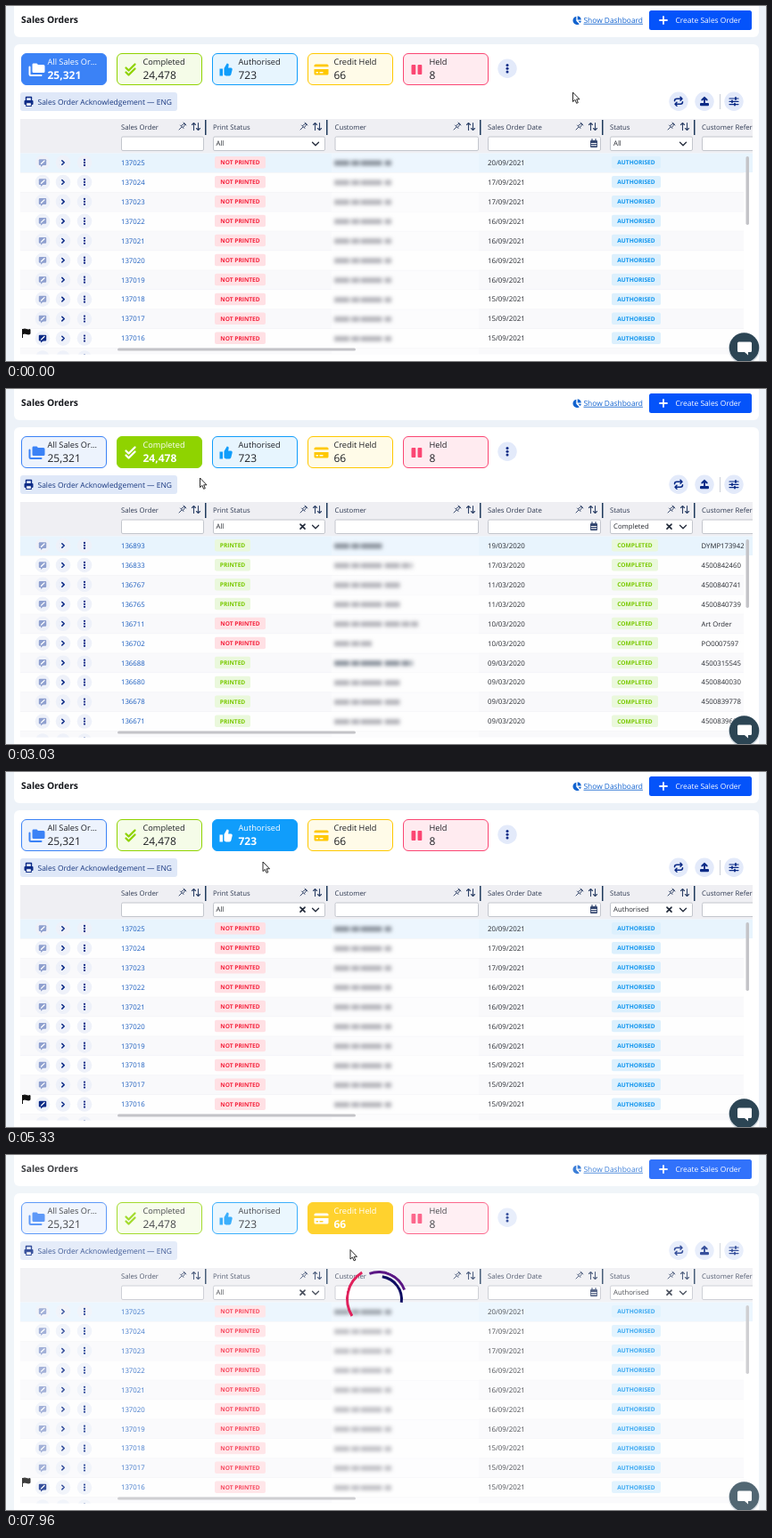
These frames come from a looping animation (852x399 px, 8000 ms). An HTML page:

```html
<!DOCTYPE html>
<html lang="en">
<head>
<meta charset="utf-8">
<title>Sales Orders</title>
<style>
html, body { margin: 0; width: 100%; height: 100%; overflow: hidden; background: #edf2f8; }
#stage { position: absolute; left: 0; top: 0; width: 852px; height: 399px; overflow: hidden; }
svg { position: absolute; left: 0; top: 0; }
text { font-family: "Open Sans", "Noto Sans", sans-serif; text-rendering: geometricPrecision; white-space: pre; }
.line { fill: none; stroke: currentColor; stroke-linecap: round; stroke-linejoin: round; }
.card { color: var(--main); }
.card rect.box { fill: var(--pale); stroke: var(--main); }
.card text { fill: #1d1f24; }
.card.on { color: #fff; }
.card.on rect.box { fill: var(--main); }
.card.on text { fill: #fff; }
.card.on .num { font-weight: 700; }
#wash { position: absolute; inset: 0; background: #fff; }
.ring { position: absolute; box-sizing: border-box; border: 3px solid transparent; border-radius: 50%; }
</style>
</head>
<body>
<div id="stage">
  <svg id="page" width="852" height="399"></svg>
  <div id="wash"></div>
  <div id="spin"></div>
  <svg width="852" height="399"><path id="cursor" d="M0 0V10.6L2.4 8.4 4.1 12.3 5.8 11.6 4.2 7.8H7.5Z" fill="#fff" stroke="#111" stroke-width=".9"/></svg>
</div>
<script>
const $ = id => document.getElementById(id);
const NAVY = '#0b2a86', INK = '#24272e';

const text = (x, y, s, size, fill = INK, weight = 400, more = '') =>
  `<text x="${x}" y="${y}" font-size="${size}" fill="${fill}" font-weight="${weight}" ${more}>${s}</text>`;
const rect = (x, y, w, h, fill, r = 0, more = '') =>
  `<rect x="${x}" y="${y}" width="${w}" height="${h}" rx="${r}" fill="${fill}" ${more}/>`;
const disc = (x, y, r, fill) => `<circle cx="${x}" cy="${y}" r="${r}" fill="${fill}"/>`;
const line = (d, width = 1.3, color = 'currentColor') =>
  `<path class="line" d="${d}" stroke-width="${width}" style="color:${color}"/>`;
const at = (x, y, s) => `<g transform="translate(${x} ${y})">${s}</g>`;
const dots = (x, y, gap, r) => [-gap, 0, gap].map(d => disc(x, y + d, r, NAVY)).join('');

// Summary cards
const cardIcons = [
  `<path d="M-4-7h4l1.500 1.500h6q1.500 0 1.500 1.500v6q0 1.500-1.500 1.500h-11q-1.500 0-1.500-1.500v-7.500q0-1.500 1-1.500z" fill="currentColor"/>` +
  line('M-8-3V5Q-8 6.500-6.500 6.500H5', 2),
  line('M-5-2L-2 1 5-6M-5 3L-2 6 5-1', 2.3),
  `<path d="M-7-1h3.500V7H-7zM-2-1.500L1.200-7q2.300 0 1.900 2.400L2.600-2H6q1.500.4 1.200 2L5.800 5.600Q5.400 7 4 7H0L-2 5.800z" fill="currentColor"/>`,
  `<path fill-rule="evenodd" d="M-6.500-6h13q1.500 0 1.500 1.500v9q0 1.500-1.500 1.500h-13Q-8 6-8 4.500v-9Q-8-6-6.500-6zM-8-3.200v2.700H8v-2.700zM-6 2.400v1.500h2.500V2.400zM-2 2.400v1.500h4V2.400z" fill="currentColor"/>`,
  rect(-6, -5.5, 4.8, 11, 'currentColor', 1) + rect(1, -5.5, 4.8, 11, 'currentColor', 1)
];
const cards = [
  ['All Sales Or...', '25,321', '#3b82f6', '#edf3fd'],
  ['Completed', '24,478', '#8fd300', '#f5fce8'],
  ['Authorised', '723', '#109dfb', '#e7f5fe'],
  ['Credit Held', '66', '#ffc800', '#fffbe8'],
  ['Held', '8', '#fb4673', '#ffebf0']
];
const cardSvg = ([label, num, main, pale], i) => {
  const x = 17 + 107 * i;
  return `<g class="card" style="--main:${main};--pale:${pale}">` +
    `<rect class="box" x="${x + .5}" y="53.500" width="95" height="35" rx="5.500"/>` +
    at(x + (i ? 15.5 : 17.5), 71.5, cardIcons[i]) +
    text(x + 29.5, 66, label, 9.2) +
    text(x + 29.5, 82, num, 12, INK, 400, 'class="num"') + '</g>';
};

// Table
const columns = [
  ['Sales Order', 129, 222], ['Print Status', 232, 358], ['Customer', 368.5, 530],
  ['Sales Order Date', 540, 667], ['Status', 677, 770], ['Customer Reference', 780, 880]
];
const pin = line('M1-4L4-1M2-3L-1.500-.5M3-2L.5 1.500M-2.500-1L1 2.500M-1 1L-4 4', 1, '#3c4d70');
const sort = line('M-2.500 4V-4M-4.500-2L-2.500-4-.5-2M2.500-4V4M.5 2L2.500 4 4.500 2', 1.1, '#2e4268');
const down = line('M-3.500-1.500L0 2 3.500-1.500', 1.3, '#222a3a');
const cross = line('M-2.500-2.500L2.500 2.500M2.500-2.500L-2.500 2.500', 1.7, '#222a3a');
const calendar = rect(-4, -3.5, 8, 8, '#33466f', 1) + line('M-2-5V-3M2-5V-3', 1.2, '#33466f') +
  line('M-2.800 0H2.800M-2.800 2.300H2.800', 1, '#fff');

const columnSvg = ([name, x, end], i) =>
  text(x, 138.7, name, 7.75, '#2f3a52') +
  rect(x + .5, 147, end - x - 1, 15.5, '#fff', 1.5, 'stroke="#c3c6cd"') +
  (i < 5 ? at(end - 24, 135, pin) + at(end - 9, 135.5, sort) + rect(end + 1, 128, 1.5, 17, '#1f3a5c') : '') +
  (i === 3 ? at(659, 154.5, calendar) : '') +
  (i === 1 || i === 4 ? at(end - 11, 154.7, down) : '');

const badge = (x, y, s, color, pale, w) =>
  rect(x, y - 7, w, 13.5, pale, 2) +
  text(x + w / 2, y + 2.3, s, 6.6, color, 700, 'text-anchor="middle"');

const note = (y, color) => at(41, y, rect(-4.2, -3.8, 8.4, 6.8, color, 1) +
  `<path d="M-2 2.500V5L1 2.500z" fill="${color}"/>` + line('M-1.500 1.300L2-2', 1.3, '#fff'));

const rowIcons = (y, color) => [41, 64, 88].map(x => disc(x, y, 8.3, '#eef1f9')).join('') +
  note(y, color) + at(64, y, line('M-1.200-2.300L1.200 0-1.200 2.300', 1.5, NAVY)) + dots(88, y, 3, 1.15);

const blurred = (y, w, dark) => `<path d="M368 ${y + .5}H${368 + w}" stroke="${dark ? '#8b939d' : '#b4b4ba'}" ` +
  `stroke-width="6" stroke-dasharray="17 2 9 1.500 24 3" filter="url(#soft)"/>`;

function rowSvg(r, i) {
  const y = 176 + 21.95 * i;
  const fill = i === 0 ? '#e8f4fd' : i % 2 ? '#fefefe' : '#f9f9fb';
  let s = rect(16, y - 10.5, 813, 21.9, fill) + rect(16, y + 11, 813, .6, '#ececf0') +
    rect(365, y - 10, 165, 21, '#fff', 0, `opacity="${i ? .5 : .2}"`) +
    rowIcons(y, r.dark ? NAVY : '#8fa0cf');
  if (!r.id) return s;
  s += text(129, y + 2.8, r.id, 7.75, '#1559bd') + blurred(y, r.width, i === 0 || r.bold) +
    text(540, y + 2.8, r.date, 7.85) + text(779.5, y + 2.8, r.ref || '', 7.75);
  s += r.printed ? badge(234, y, 'PRINTED', '#79c900', '#eaf8dc', 40)
    : badge(234, y, 'NOT PRINTED', '#f5213c', '#ffe0e4', 57);
  s += r.done ? badge(679, y, 'COMPLETED', '#79c900', '#eaf8dc', 52)
    : badge(679, y, 'AUTHORISED', '#0e94ee', '#dcf0fd', 55);
  if (r.dark) s += `<path d="M18.500 363V373M19 363.500q2-1 4 0t4 0v5q-2 1-4 0t-4 0z" fill="#111" stroke="#111"/>`;
  return s;
}

const days = [20, 17, 17, 16, 16, 16, 16, 15, 15, 15];
const openRows = days.map((d, i) => ({
  id: 137025 - i, date: d + '/09/2021', width: 64, dark: i === 9
}));
const doneRows = [
  [136893, 19, 'DYMP173942', 56], [136833, 17, '4500842460', 88], [136767, 11, '4500840741', 74],
  [136765, 11, '4500840739', 74], [136711, 10, 'Art Order', 94], [136702, 10, 'PO0007597', 42],
  [136688, '09', '4500315545', 88], [136680, '09', '4500840030', 74],
  [136678, '09', '4500839778', 74], [136671, '09', '4500839601', 74]
].map(([id, day, ref, width], i) => ({
  id, ref, width, date: day + '/03/2020', done: true, printed: i !== 4 && i !== 5, bold: i === 6
}));
const tableSvg = (id, rows) => `<g id="${id}" clip-path="url(#body)">${[...rows, {}].map(rowSvg).join('')}</g>`;

// Toolbar icons
const printer = rect(-5, -1.5, 10, 5, NAVY, 1) + line('M-3-2V-5H3V-2', 1.4, NAVY) +
  rect(-2.8, 1.2, 5.6, 3.8, '#fff', 0, `stroke="${NAVY}"`);
const refresh = line('M-4.500-.5Q-4.500-3-2-3H4M2-5L4-3 2-1M4.500.5Q4.500 3 2 3H-4M-2 1L-4 3-2 5', 1.5, NAVY);
const upload = line('M0 1.500V-4M-2.700-1.800L0-4.500 2.700-1.800', 1.9, NAVY) + rect(-5, 1.7, 10, 3.3, NAVY, 1);
const sliders = line('M-5-3.300H5M-5 0H5M-5 3.300H5', 1.2, NAVY) +
  line('M2-4.300V-2.300M-2-1V1M1 2.300V4.300', 1.8, NAVY);
const tool = (x, icon) => disc(x, 107.3, 10.7, '#e3eafa') + at(x, 107.3, icon);

$('page').innerHTML = `<defs>
  <filter id="soft" filterUnits="userSpaceOnUse" x="350" y="160" width="180" height="240"><feGaussianBlur stdDeviation="2.300"/></filter>
  <clipPath id="body"><rect x="16" y="165" width="811" height="226.500"/></clipPath>
  <clipPath id="head"><rect x="16" y="126" width="821" height="40"/></clipPath></defs>` +
  rect(0, 0, 852, 399, '#edf2f8') + rect(9, -8, 835, 43, '#fff', 6) + rect(9, 43, 835, 370, '#fff', 6) +
  text(17, 18.5, 'Sales Orders', 10.3, '#14161b', 700) +
  at(640, 16, `<path d="M-.7-4.300V.7L2.800 4.200A4.700 4.700 0 1 1-.7-4.300zM.7-4.700A4.700 4.700 0 0 1 4.800-.5H.7zM1.500.7H4.900A4.700 4.700 0 0 1 3.700 3z" fill="#1263cf"/>`) +
  text(647.5, 18.8, 'Show Dashboard', 8.4, '#1263cf', 400, 'text-decoration="underline"') +
  rect(721, 5, 115, 22, '#0453fa', 2.5) + line('M733 16H741M737 12V20', 1.8, '#fff') +
  text(750.5, 19, 'Create Sales Order', 8.45, '#fff') +
  cards.map(cardSvg).join('') +
  disc(562, 70.3, 10.7, '#e3eafa') + dots(562, 70.3, 3.7, 1.5) +
  rect(16, 97, 176, 21, '#dfe8f8', 3) + at(25.500, 107.500, printer) +
  text(35.5, 111, 'Sales Order Acknowledgement — ENG', 8.45, '#16367f') +
  tool(754, refresh) + tool(783, upload) + tool(816, sliders) + rect(800, 99, 1, 17, '#c9ced8') +
  `<g clip-path="url(#head)">` + rect(16, 127, 821, 38.500, '#efeff3') + columns.map(columnSvg).join('') +
  text(235.500, 157.400, 'All', 7.75) +
  `<text id="status" x="681" y="157.400" font-size="7.750" fill="${INK}"></text>` +
  `<g id="clear">${at(332.5, 154.7, cross)}${at(743.5, 154.7, cross)}</g></g>` +
  rect(827, 165.500, 10, 21.500, '#e8f4fd') +
  tableSvg('open', openRows) + tableSvg('done', doneRows) +
  rect(829.5, 169, 3.5, 77, '#c4c4c8', 1.7) +
  rect(125, 384.5, 267, 3, '#c4c4c8', 1.5) +
  disc(827.5, 385, 17.5, '#d3dae1') + disc(827.5, 384, 16.7, '#2c4554') +
  `<path d="M821.500 377.500h13q1.500 0 1.500 1.500v8.500q0 1.500-1.500 1.500h-2.500v3.500l-4-3.500h-6.500q-1.500 0-1.500-1.500V379q0-1.500 1.500-1.500z" fill="#fff"/>`;

// diameter, colour, degrees per second
const rings = [[74, '#e0215c', 498], [64, '#5b1785', 298], [54, '#0e0c62', 878]];
$('spin').innerHTML = rings.map(([d, c]) =>
  `<div class="ring" style="width:${d}px;height:${d}px;left:${417.5 - d / 2}px;top:${161.5 - d / 2}px;border-top-color:${c}"></div>`).join('');

const LOOP = 8000;
const loads = [[1800, 2940], [4050, 4930], [6670, 9000]];
const picks = [1770, 4030, 6650];

// time, x, y of the pointer
const path = [
  [0, 635.5, 97], [430, 635.5, 97], [800, 470, 102], [1230, 253, 97], [1460, 215.5, 95],
  [1760, 182, 76], [1900, 182, 76], [2100, 197, 88], [2500, 212, 97], [2900, 217.5, 100],
  [3330, 217.5, 100], [3700, 250, 88], [4060, 279.5, 73], [4160, 279.5, 73], [4600, 284, 90],
  [4930, 288, 101], [5330, 288, 101], [5600, 312, 108], [5900, 370, 68], [6130, 404, 36],
  [6500, 383, 67], [6700, 383, 67], [6960, 370.5, 101], [7060, 370.5, 102],
  [7400, 379, 105], [7800, 386, 106.5], [8000, 386, 106.5]
];
const same = (a, b) => a[1] === b[1] && a[2] === b[2];
function slope(i, k) {
  const a = path[i - 1], b = path[i], c = path[i + 1];
  if (!a || !c || same(a, b) || same(b, c)) return 0;
  return (c[k] - a[k]) / (c[0] - a[0]);
}
function pointer(t, k) {
  let i = 0;
  while (i < path.length - 2 && path[i + 1][0] <= t) i++;
  const a = path[i], b = path[i + 1], span = b[0] - a[0], u = (t - a[0]) / span;
  const v = 1 - u, ease = u * u * (3 - 2 * u);
  return a[k] + (b[k] - a[k]) * ease + span * u * v * (slope(i, k) * v - slope(i + 1, k) * u);
}

const cardEls = [...document.querySelectorAll('.card')];
const ringEls = [...document.querySelectorAll('.ring')];
const show = (el, on) => { el.style.display = on ? '' : 'none'; };

function draw(t) {
  const picked = picks.filter(p => t >= p).length;
  cardEls.forEach((el, i) => el.classList.toggle('on', i === picked));

  const step = loads.filter(l => t >= l[1]).length;
  show($('done'), step === 1);
  show($('open'), step !== 1);
  show($('clear'), step > 0);
  $('status').textContent = ['All', 'Completed', 'Authorised'][step];

  const load = loads.find(l => t >= l[0] && t < l[1]);
  const ended = step ? t - loads[step - 1][1] : LOOP;
  $('wash').style.opacity = load ? .18 : .18 * Math.max(0, 1 - ended / 80);
  show($('spin'), load);
  if (load) ringEls.forEach((el, i) => {
    el.style.transform = `rotate(${(t - load[0]) / 1000 * rings[i][2]}deg)`;
  });
  $('cursor').setAttribute('transform', `translate(${pointer(t, 1)} ${pointer(t, 2)})`);
}

const start = performance.now();
function tick() {
  draw((performance.now() - start) % LOOP);
  requestAnimationFrame(tick);
}
tick();
</script>
</body>
</html>
```
